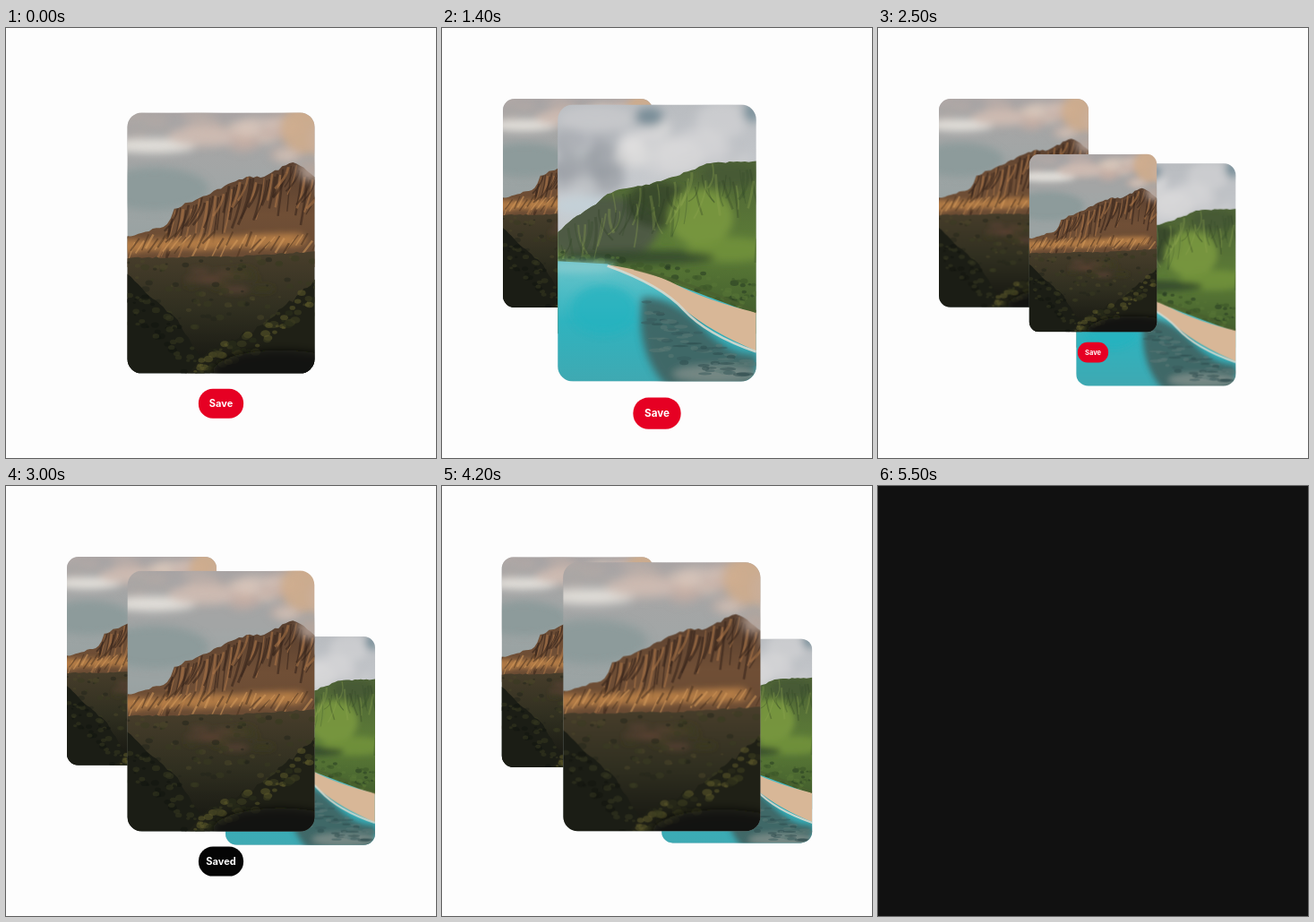
These frames come from a looping animation (480x480 px, 5700 ms). An HTML page:

```html
<!DOCTYPE html>
<html lang="en">
<head>
<meta charset="utf-8">
<title>Saving pictures</title>
<style>
  html, body { margin: 0; width: 100%; height: 100%; overflow: hidden; background: #fdfdfd; }
  svg { display: block; width: 100vw; height: 100vh; }
  text { font: 700 11px Inter, Roboto, sans-serif; fill: #fff; text-anchor: middle; }
</style>
</head>
<body>
<svg id="stage" viewBox="0 0 480 480"></svg>
<script>
const LOOP = 5700, STEP = 100, W = 208, H = 290;
const stage = document.getElementById('stage');

const mix = (a, b, p) => a + (b - a) * p;
const ramp = (t, a, b) => Math.min(1, Math.max(0, (t - a) / (b - a)));
const smooth = p => p * p * (3 - 2 * p);

// ---------- drawing helpers ----------
let seed = 7;
const rnd = (a, b) => {
  seed = (seed * 16807) % 2147483647;
  return a + (b - a) * seed / 2147483647;
};
const pick = list => list[Math.floor(rnd(0, list.length))];
const repeat = (n, make) => Array.from({ length: n }, (_, i) => make(i)).join('');
const blob = (x, y, rx, ry, fill, o = 1) =>
  `<ellipse cx="${x.toFixed(1)}" cy="${y.toFixed(1)}" rx="${rx.toFixed(1)}" ry="${ry.toFixed(1)}" fill="${fill}" opacity="${o}"/>`;
const soft = (n, body) => `<g filter="url(#blur${n})">${body}</g>`;
const stroke = (d, color, width, o = 1) =>
  `<path d="${d}" fill="none" stroke="${color}" stroke-width="${width}" opacity="${o}"/>`;
const rect = (x, y, w, h, fill) => `<rect x="${x}" y="${y}" width="${w}" height="${h}" fill="${fill}"/>`;
const blur = n => `<filter id="blur${n}" x="-30%" y="-30%" width="160%" height="160%">
  <feGaussianBlur stdDeviation="${n}"/></filter>`;
const gradient = (id, ...colors) =>
  `<linearGradient id="${id}" x2="0" y2="1">${colors.map((c, i) =>
    `<stop offset="${i / (colors.length - 1)}" stop-color="${c}"/>`).join('')}</linearGradient>`;
const clip = (id, d) => `<clipPath id="${id}"><path d="${d}"/></clipPath>`;

// Height of a line through a few key points.
const heightAt = (keys, x) => {
  const i = Math.max(1, keys.findIndex(k => k[0] >= x));
  const [a, b] = [keys[i - 1], keys[i]];
  return mix(a[1], b[1], ramp(x, a[0], b[0]));
};
// Land below such a line, with a rough upper edge.
const land = (keys, rough, bottom = H) => {
  const x0 = keys[0][0], x1 = keys[keys.length - 1][0];
  let d = `M${x0} ${bottom}`;
  for (let x = x0; x <= x1; x += 4) d += `L${x} ${(heightAt(keys, x) + rnd(-rough, rough)).toFixed(1)}`;
  return `${d}V${bottom}Z`;
};
// Clouds or foliage scattered over a box.
const scatter = (n, [x0, x1], [y0, y1], size, colors, o = .6, flat = .5) => repeat(n, () => {
  const r = rnd(size * .4, size);
  return blob(rnd(x0, x1), rnd(y0, y1), r, r * flat, pick(colors), o);
});
// Leaves hanging below a slope.
const thicket = (n, keys, depth, size, colors, o) => repeat(n, () => {
  const x = rnd(keys[0][0], keys[keys.length - 1][0]), r = rnd(size * .3, size);
  return blob(x, heightAt(keys, x) + rnd(0, depth), r, r * .7, pick(colors), o);
});

// Sunlit ridge above a dark valley; wider than a card.
function valley() {
  const ridge = [[-24, 132], [0, 138], [45, 125], [52, 107], [135, 70], [148, 73], [186, 54], [208, 72], [280, 106]];
  const left = [[-24, 160], [0, 181], [55, 231], [92, 290]];
  const right = [[64, 290], [92, 262], [145, 240], [208, 188], [280, 145]];
  const rock = land(ridge, 1.5, 172);
  return clip('rockClip', rock) + rect(-24, 0, 304, H, 'url(#skyA)') +
    soft(5, scatter(16, [-20, 130], [0, 26], 26, ['#a9a6a5', '#c6b3ab', '#b5aaa6']) +
      blob(28, 37, 48, 8, '#e8e5df', .9) + blob(85, 27, 40, 11, '#d3bfb5', .8) +
      scatter(14, [110, 178], [8, 48], 22, ['#d2b7a8', '#dcc9bd', '#c2aca3']) +
      blob(200, 18, 30, 28, '#d0ac8c', .9) + blob(245, 30, 45, 30, '#cbb09c', .8) +
      blob(30, 85, 60, 24, '#8b9b9b', .9)) +
    `<path d="${rock}" fill="url(#rockA)"/><g clip-path="url(#rockClip)">` +
    repeat(62, i => {
      const x = 44 + i * 3, len = rnd(22, 55), drop = rnd(-16, -4);
      return stroke(`M${x} ${heightAt(ridge, x) + rnd(1, 9)}q-2 ${len / 2} ${drop} ${len}`,
        i % 3 ? '#38261c' : '#a87346', rnd(1, 3), .6);
    }) +
    soft(3, repeat(14, i => blob(-10 + i * 15, 149 - i * .6, 14, rnd(5, 9), '#b98048', .75))) +
    repeat(45, i => stroke(`M${-18 + i * 5.2} ${rnd(132, 146)}l${rnd(-14, -5)} ${rnd(10, 20)}`,
      i % 2 ? '#d69c5b' : '#49321f', rnd(1, 2.5), .55)) + '</g>' +
    soft(5, scatter(10, [194, 250], [52, 84], 15, ['#c8b3a6', '#b8a59b'], .7, .8)) +
    `<path d="${land([[-24, 162], [120, 160], [208, 154], [280, 150]], 1)}" fill="url(#landA)"/>` +
    soft(3, scatter(14, [60, 165], [176, 198], 18, ['#5f4336', '#55432f', '#3b3c22'], .6, .3)) +
    thicket(150, [[-24, 165], [280, 158]], 80, 5, ['#4b4629', '#23251a', '#393b21'], .5) +
    `<path d="${land(left, 2)}" fill="#1b1d15"/>` +
    thicket(70, left, 45, 5, ['#353720', '#12140f'], .55) +
    `<path d="${land(right, 3)}" fill="#1f2016"/>` +
    thicket(110, right, 26, 6, ['#595529', '#3c3d20', '#2b2d1a'], .6) +
    soft(5, blob(170, 288, 75, 24, '#10110c', .8)) +
    scatter(55, [250, 280], [60, 230], 9, ['#25271d', '#34351f'], .9, .8) +
    scatter(14, [264, 280], [8, 60], 6, ['#25271d'], .9, .8);
}

// Green headland, curved beach and a shallow lagoon.
function bay() {
  const ridge = [[0, 134], [14, 121], [44, 101], [54, 92], [110, 80], [160, 61], [208, 60]];
  const hill = land(ridge, 1, 240);
  const sand = 'M52 168Q94 173 125 189T208 218V258Q160 238 132 214Q108 188 52 168Z';
  return clip('hillClip', hill) + rect(0, 0, W, H, 'url(#skyB)') +
    soft(5, scatter(18, [0, 75], [35, 88], 26, ['#9599a0', '#a7abb1', '#c4c6ca'], .6, .7) +
      scatter(20, [75, 200], [15, 58], 28, ['#d5d6d8', '#e4e3e2', '#b9bcc1'], .6, .7) +
      blob(40, 15, 40, 14, '#c9cacc', .8) + blob(28, 106, 32, 10, '#c3d3da', .8) +
      blob(96, 13, 15, 10, '#6d8490', .85) + blob(203, 8, 9, 11, '#6f8894', .85)) +
    `<path d="${hill}" fill="url(#hillB)"/><g clip-path="url(#hillClip)">` +
    soft(4, blob(45, 130, 60, 34, '#4d5848', .9) + blob(105, 105, 34, 24, '#35452c', .85) +
      blob(150, 118, 34, 30, '#7c9a41', .85) + blob(180, 152, 45, 13, '#74943d', .8) +
      blob(180, 74, 30, 13, '#475a33', .9) + blob(85, 160, 80, 8, '#31472a', .8)) +
    repeat(60, i => {
      const x = i * 3.6;
      return stroke(`M${x} ${heightAt(ridge, x) + rnd(1, 26)}q${rnd(-3, 5)} 16 ${rnd(-18, 16)} ${rnd(20, 46)}`,
        pick(['#2b3c22', '#324928', '#8ea652']), rnd(1, 3), .3);
    }) +
    thicket(130, [[0, 148], [100, 166], [208, 185]], 30, 5, ['#577636', '#2b4023', '#3c5729'], .6) + '</g>' +
    `<path d="M0 164L52 167L125 189L208 220V290H0Z" fill="url(#seaB)"/>` +
    soft(4, blob(22, 170, 40, 6, '#8accd0', .8) + blob(48, 215, 34, 26, '#24b2bf', .7) +
      `<path d="M88 202Q120 200 150 232T208 262V300H118Q80 262 88 202Z" fill="#41605f" opacity=".9"/>` +
      blob(165, 282, 45, 9, '#84918c', .8)) +
    repeat(70, () => {
      const x = rnd(92, 205);
      return blob(x, x * .6 + rnd(150, 195), rnd(3, 9), rnd(1, 2.5), pick(['#2c4a4c', '#5d7a77', '#37585a']), .5);
    }) +
    `<path d="${sand}" fill="#d8b797"/>` +
    stroke('M52 169Q108 189 132 215T208 259', '#e2ddd2', 2.5, .85) +
    stroke('M80 172Q140 187 208 217', '#4a6030', 3, .7);
}

stage.innerHTML = `<defs>${blur(3)}${blur(4)}${blur(5)}
  ${gradient('skyA', '#a9a4a4', '#a2a6a6', '#98a2a2', '#98a2a2', '#98a2a2')}
  ${gradient('rockA', '#573e2e', '#704f36', '#684a33')}
  ${gradient('landA', '#4a3f2c', '#302f20', '#131410')}
  ${gradient('skyB', '#b9bcc0', '#c9ccd0', '#bcc8ce', '#bcc8ce')}
  ${gradient('hillB', '#4d6136', '#5d7d37', '#3b552b')}
  ${gradient('seaB', '#6cc5cb', '#2fb3bf', '#3fa9b2')}
  <g id="valley">${valley()}</g><g id="bay">${bay()}</g></defs>
  ${rect(0, 0, 480, 480, '#fdfdfd')}
  ${['valley', 'bay', 'valley'].map((pic, i) => `<g class="card">
    <clipPath id="crop${i}"><path class="crop"/></clipPath>
    <g clip-path="url(#crop${i})"><use href="#${pic}"/></g>
    <g class="button"><rect x="-25" y="-16.5" width="50" height="33" rx="16"/><text y="4"></text></g>
  </g>`).join('')}
  <rect id="blank" width="480" height="480" fill="#111"/>`;

// ---------- motion ----------
const PERIOD = 1200, BIG = 1.067, SMALL = .803;
const POP = 350, MOVE = 360, GATHER = 4150;

// Grows past full size, then settles.
const backOut = u => 1 + 2 * (u - 1) ** 3 + (u - 1) ** 2;
const press = t => 1 - .06 * Math.sin(Math.PI * ramp(t, -150, 150));

const sized = (x, y, s) => ({ x, y, w: W * s, h: H * s, k: s, dx: 0, dy: 0, r: Array(4).fill(16 * s) });
const centred = s => sized(240 - W / 2 * s, 240 - H / 2 * s, s);
const blend = (a, b, p) => {
  const out = {};
  for (const key in a)
    out[key] = key === 'r' ? a.r.map((v, i) => mix(v, b.r[i], p)) : mix(a[key], b[key], p);
  return out;
};

const cards = [
  { pop: -145, aside: sized(68, 79, SMALL),
    cell: { x: 45, y: 84.5, w: 201.5, h: 269, k: .95, dx: 13, dy: -2, r: [15, 0, 0, 15] } },
  { pop: PERIOD + 26, aside: sized(245, 168, SMALL),
    cell: { x: 250, y: 221, w: 185, h: 132.5, k: .95, dx: -10, dy: -92, r: [0, 0, 15, 0] } },
  { pop: 2 * PERIOD + 26,
    cell: { x: 250, y: 84.5, w: 185, h: 131.5, k: .67, dx: 2, dy: -5, r: [0, 15, 0, 0] } }
];
const nodes = [...stage.querySelectorAll('.card')].map(g => ({
  g,
  crop: g.querySelector('.crop'),
  pic: g.querySelector('use'),
  button: g.querySelector('.button'),
  pill: g.querySelector('.button rect'),
  label: g.querySelector('text')
}));
const blank = document.getElementById('blank');
const show = (node, on) => { node.style.display = on ? '' : 'none'; };

const cropPath = ({ x, y, w, h, r: [a, b, c, d] }) =>
  `M${x + a} ${y}H${x + w - b}a${b} ${b} 0 0 1 ${b} ${b}V${y + h - c}a${c} ${c} 0 0 1 ${-c} ${c}` +
  `H${x + d}a${d} ${d} 0 0 1 ${-d} ${-d}V${y + a}a${a} ${a} 0 0 1 ${a} ${-a}Z`;

function draw(t) {
  const gather = smooth(ramp(t, GATHER, GATHER + MOVE));
  cards.forEach(({ pop, aside, cell }, i) => {
    const n = nodes[i];
    show(n.g, t > pop);
    if (t <= pop) return;

    const saveAt = i * PERIOD + 600, leaveAt = i * PERIOD + 1045;
    const scale = BIG * backOut(ramp(t, pop, pop + POP)) * press(t - saveAt);
    const away = aside ? smooth(ramp(t, leaveAt, leaveAt + MOVE)) : 0;
    let box = centred(scale);
    if (aside) box = blend(box, aside, away);
    box = blend(box, cell, gather);

    n.crop.setAttribute('d', cropPath(box));
    n.pic.setAttribute('transform', `translate(${box.x + box.dx} ${box.y + box.dy}) scale(${box.k})`);

    const gone = aside ? ramp(away, 0, .4) : ramp(t, GATHER - 150, GATHER + 50);
    const saved = t >= saveAt;
    show(n.button, gone < 1);
    n.button.setAttribute('opacity', 1 - gone);
    n.button.setAttribute('transform', `translate(240 ${240 + 178.5 * scale}) scale(${scale})`);
    n.pill.setAttribute('fill', saved ? '#050505' : '#e60023');
    n.label.textContent = saved ? 'Saved' : 'Save';
  });
  show(blank, t >= 5500);
}

const origin = performance.now();
let last = -1;
function tick() {
  const t = Math.floor(((performance.now() - origin) % LOOP) / STEP) * STEP;
  if (t !== last) draw(last = t);
  requestAnimationFrame(tick);
}
tick();
</script>
</body>
</html>
```
